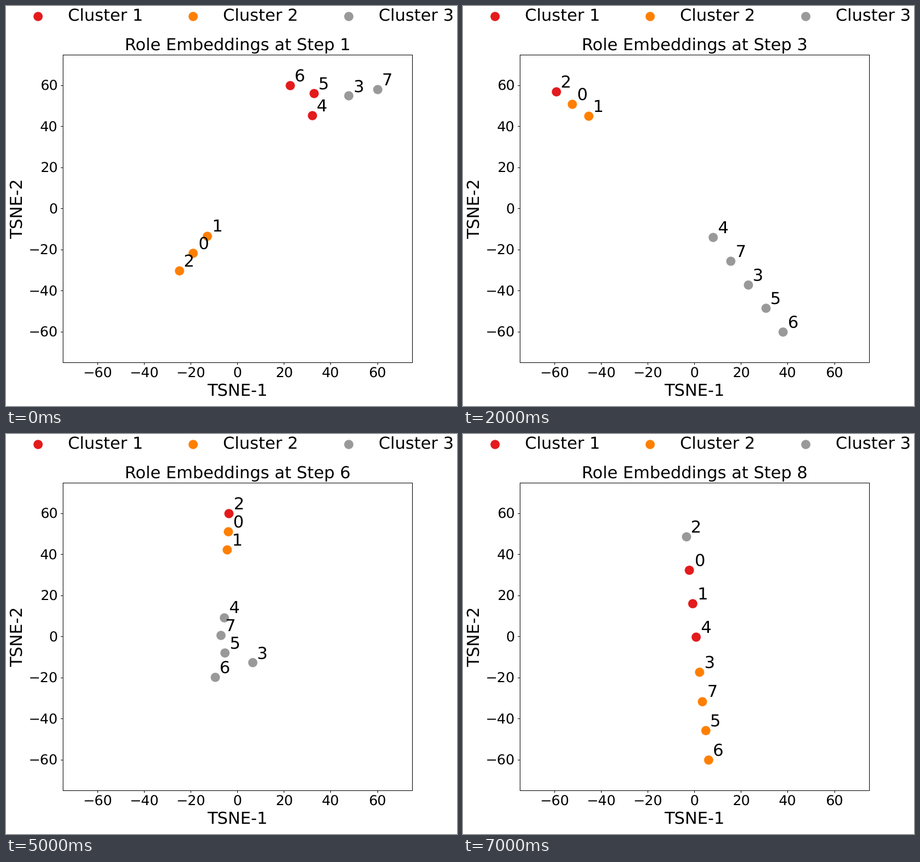
Animation, 794 px wide and 706 px high, one loop 8 s. Source, as a matplotlib script:

```python
import matplotlib.pyplot as plt
import numpy as np
from matplotlib.animation import FuncAnimation

DPI = 88.25
COLORS = ["#e41a1c", "#ff7f00", "#999999"]
LABEL_SHIFT = 2 + 2j

plt.rcParams["font.family"] = "DejaVu Sans"
plt.rcParams["text.hinting"] = "none"


def chain(agents, start, end=0, bend=0):
    """Space agents evenly from start to end (x + yj), bowed sideways."""
    t = np.linspace(0, 1, len(agents))
    points = start + (end - start) * (t + 1j * bend * np.sin(np.pi * t))
    return dict(zip(map(int, agents), points))


# Members of clusters 1 to 3, then the chains that place all agents.
EARLY, MIDDLE = "456 012 37", "2 01 34567"
STEPS = [
    (EARLY, chain("201", -25 - 30.2j, -13 - 13.3j)
     | chain("654", 22.6 + 60j, 32 + 45.3j, 0.37)
     | chain("37", 47.8 + 54.9j, 60 + 58j)),
    (MIDDLE, chain("201", -58.9 + 54j, -52 + 40.7j, -0.29)
     | chain("456", 25 - 40.3j, 45.1 - 32.3j, -0.18)
     | chain("37", 36.5 - 50.2j, 41 - 60j)),
    (MIDDLE, chain("201", -59.4 + 57j, -45.5 + 45j)
     | chain("47356", 8 - 14j, 38 - 60j)),
    (MIDDLE, chain("201", -60 + 60j, -39.1 + 48.6j)
     | chain("47", -12.4 + 31.7j, -4 + 28.3j)
     | chain("536", 19.8 - 32.8j, 33.7 - 30.6j, 1.03)),
    (MIDDLE, chain("201", -20 + 56j, -13.5 + 40j)
     | chain("47563", 2 + 19j, 60 - 29j)),
    (MIDDLE, chain("201", -3.7 + 60j, -4.4 + 42.4j)
     | chain("47", -5.6 + 9.3j, -7.2 + 0.7j)
     | chain("653", -9.7 - 19.8j, 6.4 - 12.7j, 0.52)),
    ("3567 014 2", chain("014", -26.5 + 38.9j, -5.8 + 30.1j, 0.27)
     | chain("756", 38.5 - 20.8j, 60 - 36.2j, -0.14)
     | chain("2", -16.1 + 60j) | chain("3", 31.2 - 35.5j)),
    ("014 3567 2", chain("2014", -3.6 + 48.7j, 0.6 - 0.2j)
     | chain("3756", 2.2 - 17.3j, 5.9 - 60j)),
]

fig, ax = plt.subplots(figsize=(8.9972, 8), dpi=DPI)
fig.subplots_adjust(left=0.1256, right=0.9006, bottom=0.1087, top=0.8787)
ticks = range(-60, 61, 20)
ax.set(xlim=(-75, 75), ylim=(-75, 75), xticks=ticks, yticks=ticks)
ax.tick_params(labelsize=20)
ax.set_xlabel("TSNE-1", fontsize=24)
ax.set_ylabel("TSNE-2", fontsize=24)
title = ax.set_title("", fontsize=24)

dots = [ax.scatter([], [], s=150, color=color, label=f"Cluster {i}")
        for i, color in enumerate(COLORS, 1)]
ax.legend(loc="lower center", bbox_to_anchor=(0.5, 1.05), ncol=3,
          fontsize=24, frameon=False)
labels = [ax.text(0, 0, str(i), fontsize=24) for i in range(8)]


def draw(step):
    clusters, places = STEPS[step]
    for dot, members in zip(dots, clusters.split()):
        points = [places[int(m)] for m in members]
        dot.set_offsets(np.column_stack([np.real(points), np.imag(points)]))
    for agent, point in places.items():
        spot = point + LABEL_SHIFT
        labels[agent].set_position((spot.real, spot.imag))
    title.set_text(f"Role Embeddings at Step {step + 1}")
    return [*dots, title, *labels]


anim = FuncAnimation(fig, draw, frames=len(STEPS), interval=1000,
                     repeat=True, repeat_delay=0)
plt.show()
```
